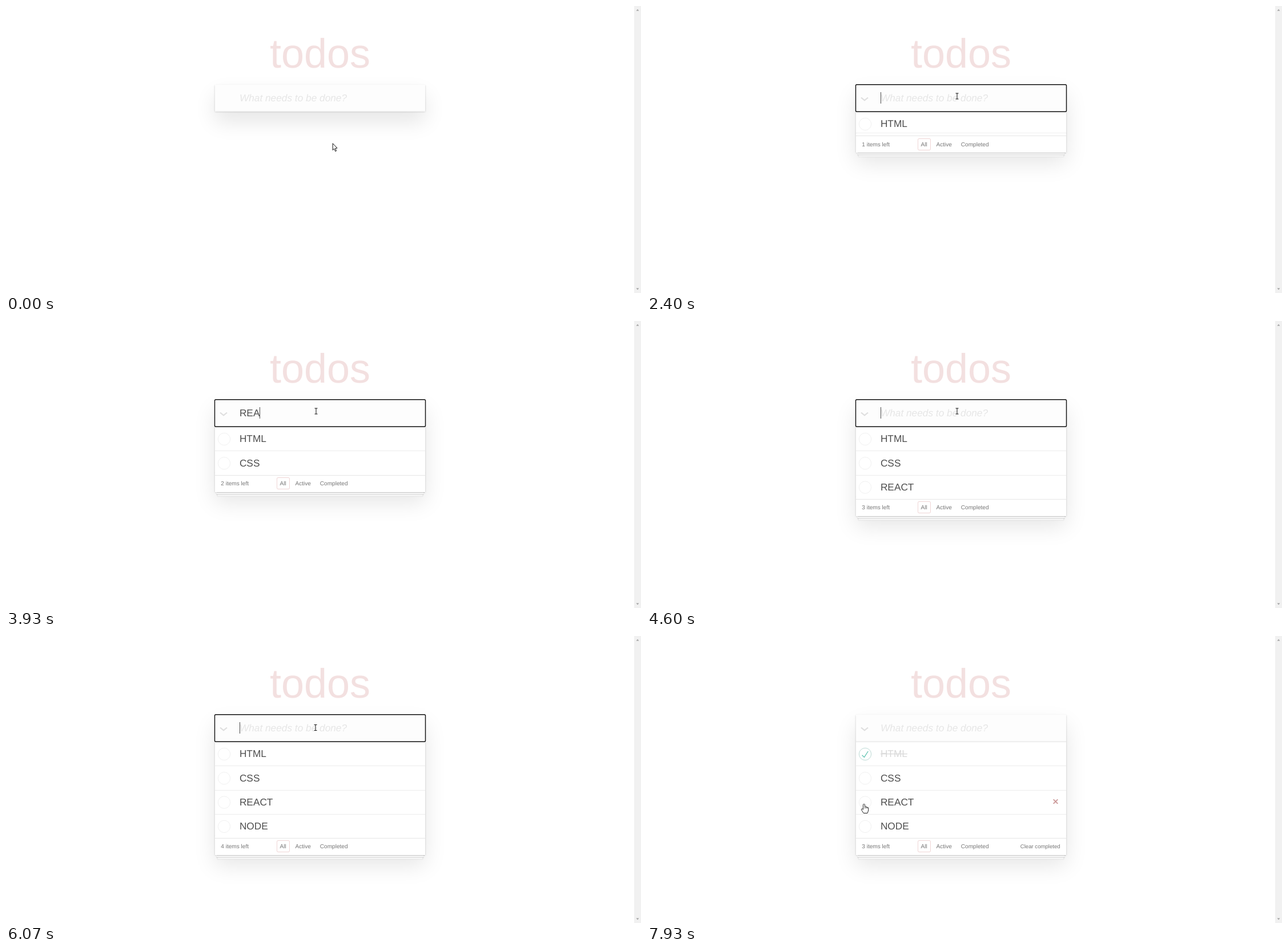
An HTML page with a canvas for the animation above (8 s loop, 1112x503 px).

```html
<!DOCTYPE html>
<html lang="en">
<head>
<meta charset="utf-8">
<title>todos</title>
<style>
  html, body { margin: 0; width: 100%; height: 100%; overflow: hidden; background: #fff; }
  canvas { display: block; }
</style>
</head>
<body>
<canvas id="stage" width="1112" height="503"></canvas>
<script>
const ctx = document.getElementById('stage').getContext('2d');

const LOOP = 8000, TICK = 200 / 3;
const LEFT = 366, RIGHT = 734, TOP = 138, LIST_TOP = 185, ROW = 42.3;
const TEXT_X = 408.9;
const SANS = '"Liberation Sans", Arial, sans-serif';

const FOCUS = 600, BLUR = 7470, CHECK = 7530, BLINK = 530;
const items = [['HTML', 1930], ['CSS', 3130], ['REACT', 4470], ['NODE', 5870]];

// Time of each keystroke; an empty string is Enter.
const typed = [
  [0, ''], [1270, 'H'], [1400, 'HT'], [1470, 'HTM'], [1730, 'HTML'], [1930, ''],
  [2530, 'C'], [2600, 'CS'], [2800, 'CSS'], [3130, ''],
  [3730, 'R'], [3800, 'RE'], [3930, 'REA'], [4070, 'REAC'], [4270, 'REACT'], [4470, ''],
  [5130, 'N'], [5200, 'NO'], [5330, 'NOD'], [5470, 'NODE'], [5870, '']
];

// Pointer hotspot: time, x, y
const path = [
  [0, 572, 242], [70, 567, 218], [270, 547, 150], [470, 547, 150], [600, 543, 158],
  [5330, 543, 158], [5400, 542.5, 160], [6070, 542.5, 160],
  [6600, 387, 327], [6670, 386, 320], [6870, 386.5, 221], [7330, 382, 206],
  [7670, 382, 206], [7930, 380, 294], [8000, 380, 294]
];

const lerp = (a, b, k) => a + (b - a) * k;
const rowY = i => LIST_TOP + ROW * i;

function last(list, t) {
  return list.reduce((found, entry) => entry[0] <= t ? entry : found);
}

function pointerAt(t) {
  const i = Math.max(1, path.findIndex(p => p[0] > t));
  const [t0, x0, y0] = path[i - 1], [t1, x1, y1] = path[i];
  const k = Math.min(1, Math.max(0, (t - t0) / (t1 - t0)));
  return { x: lerp(x0, x1, k), y: lerp(y0, y1, k) };
}

function text(str, x, y, size, color, { align = 'left', style = '' } = {}) {
  ctx.font = `${style} ${size}px ${SANS}`;
  ctx.textAlign = align;
  ctx.fillStyle = color;
  ctx.fillText(str, x, y);
}

function rect(x, y, w, h, color) {
  ctx.fillStyle = color;
  ctx.fillRect(x, y, w, h);
}

function outline(x, y, w, h, r, color, width) {
  ctx.beginPath();
  ctx.roundRect(x, y, w, h, r);
  ctx.strokeStyle = color;
  ctx.lineWidth = width;
  ctx.stroke();
}

function poly(points, { fill, stroke, width = 1, close = true }) {
  ctx.beginPath();
  points.forEach(([x, y]) => ctx.lineTo(x, y));
  if (close) ctx.closePath();
  if (fill) { ctx.fillStyle = fill; ctx.fill(); }
  if (stroke) { ctx.strokeStyle = stroke; ctx.lineWidth = width; ctx.stroke(); }
}

// Same meaning as a CSS box-shadow; the caster itself stays off stage.
function shadow(top, bottom, dy, blur, spread, color) {
  const far = 3000;
  ctx.save();
  ctx.shadowColor = color;
  ctx.shadowBlur = blur;
  ctx.shadowOffsetX = far;
  ctx.shadowOffsetY = dy;
  ctx.fillStyle = '#000';
  ctx.fillRect(LEFT - far - spread, top - spread, RIGHT - LEFT + 2 * spread, bottom - top + 2 * spread);
  ctx.restore();
}

function drawPage() {
  rect(0, 0, 1112, 503, '#fff');
  rect(1100, 0, 12, 503, '#f1f1f1');
  poly([[1103.5, 8.5], [1106, 5.5], [1108.5, 8.5]], { fill: '#a3a3a3' });
  poly([[1103.5, 494.5], [1106, 497.5], [1108.5, 494.5]], { fill: '#a3a3a3' });
  text('todos', 550, 108, 72, 'rgba(175,47,47,.15)', { align: 'center' });
}

function drawCard(count) {
  const bottom = count ? Math.round(rowY(count) + 30) : 185;
  shadow(TOP, bottom, 18, 36, 0, 'rgba(0,0,0,.1)');
  shadow(TOP, bottom, 1.44, 2.88, 0, 'rgba(0,0,0,.2)');
  if (count) {
    const top = bottom - 36;
    shadow(top, bottom, 12.24, 1.44, -4.32, 'rgba(0,0,0,.2)');
    shadow(top, bottom, 11.52, 0, -4.32, '#f6f6f6');
    shadow(top, bottom, 6.48, .72, -2.16, 'rgba(0,0,0,.2)');
    shadow(top, bottom, 5.76, 0, -2.16, '#f6f6f6');
    shadow(top, bottom, .72, .72, 0, 'rgba(0,0,0,.2)');
  }
  rect(LEFT, TOP, RIGHT - LEFT, bottom - TOP, '#fff');
  rect(LEFT, TOP, RIGHT - LEFT, LIST_TOP - TOP, '#fdfdfd');
  rect(LEFT, LIST_TOP - 2, RIGHT - LEFT, 2, '#f8f8f8');
}

function drawInput(t, count) {
  const [since, value] = last(typed, t);
  const focused = t >= FOCUS && t < BLUR;
  if (count) {
    rect(LEFT, LIST_TOP, RIGHT - LEFT, 1, '#e6e6e6');
    poly([[375, 160.5], [381, 165.3], [387, 160.5]], { stroke: '#dedede', width: 2.2, close: false });
  }
  if (value) text(value, TEXT_X, 167, 17.28, '#4d4d4d');
  else text('What needs to be done?', TEXT_X, 167, 17.28, '#e6e6e6', { style: 'italic' });
  if (!focused) return;
  outline(365.5, 137.8, 369, 47.4, 2, '#101010', 1.4);
  const idle = t - Math.max(since, FOCUS);
  if (Math.floor(idle / BLINK) % 2 === 0) {
    const w = value ? ctx.measureText(value).width : 0;
    rect(Math.round(TEXT_X + w), 151, 1, 20, '#4d4d4d');
  }
}

function drawToggle(y, checked) {
  ctx.beginPath();
  ctx.arc(382, y, 10.67, 0, 2 * Math.PI);
  ctx.strokeStyle = checked ? '#bddad5' : '#ededed';
  ctx.lineWidth = checked ? 1 : .8;
  ctx.stroke();
  if (!checked) return;
  const s = .2133;
  const tick = [[72, 25], [42, 71], [27, 56], [23, 60], [43, 80], [77, 28]];
  poly(tick.map(([a, b]) => [382 + (a - 50) * s, y + (b - 50) * s]), { fill: '#5dc2af' });
}

function drawRow(i, label, t, hovered) {
  const checked = i === 0 && t >= CHECK;
  const base = Math.round(212.4 + ROW * i);
  const fade = checked ? Math.min(1, (t - CHECK) / 290) : 0;
  const grey = Math.round(lerp(77, 217, fade));
  const color = `rgb(${grey},${grey},${grey})`;
  drawToggle(rowY(i) + 22, checked);
  text(label, TEXT_X, base, 17.28, color);
  if (checked) rect(TEXT_X, base - 6, ctx.measureText(label).width, 1.3, color);
  if (hovered) {
    const x = 715.5, y = 205.5 + ROW * i, r = 3.8;
    const look = { stroke: '#cc9a9a', width: 1.9, close: false };
    poly([[x - r, y - r], [x + r, y + r]], look);
    poly([[x + r, y - r], [x - r, y + r]], look);
  }
}

function drawFooter(t, count) {
  const base = Math.round(203.8 + 42.15 * count);
  const done = t >= CHECK;
  const label = (str, x) => text(str, x, base, 10.08, '#777');
  label(`${count - done} items left`, 376.3);
  label('All', 479.5);
  label('Active', 506.5);
  label('Completed', 549.8);
  outline(474.5, base - 13.5, 22, 20, 2, 'rgba(175,47,47,.2)', 1);
  if (done) text('Clear completed', 723.6, base, 9.6, '#777', { align: 'right' });
}

function drawList(t, count, pointer) {
  for (let i = 0; i < count; i++) {
    const inside = pointer.y >= rowY(i) && pointer.y < rowY(i + 1);
    drawRow(i, items[i][0], t, inside);
    rect(LEFT, Math.round(rowY(i + 1)), RIGHT - LEFT, 1, i === count - 1 ? '#e6e6e6' : '#ededed');
  }
  if (count === 1) rect(LEFT, 222, RIGHT - LEFT, 1, '#efefef');
  if (count) drawFooter(t, count);
}

function drawBeam() {
  const bars = (grow, color) => {
    rect(-.5 - grow, -5 - grow, 1 + 2 * grow, 10 + 2 * grow, color);
    for (const y of [-5.5, 4.5]) rect(-2.5 - grow, y - grow, 5 + 2 * grow, 1 + 2 * grow, color);
  };
  bars(.5, 'rgba(255,255,255,.7)');
  bars(0, '#111');
}

function drawArrow() {
  poly([[.5, .5], [.5, 12.3], [3.1, 9.8], [5, 14.4], [6.9, 13.6], [5, 9.1], [8.4, 8.8]],
    { fill: '#fff', stroke: '#111' });
}

function drawHand() {
  ctx.beginPath();
  ctx.moveTo(-1.5, 10);
  ctx.lineTo(-1.5, 1.5);
  ctx.quadraticCurveTo(0, -.8, 1.5, 1.5);
  ctx.lineTo(1.5, 5.2);
  ctx.quadraticCurveTo(3, 4.2, 3.9, 5.8);
  ctx.quadraticCurveTo(5.3, 5, 6, 6.6);
  ctx.quadraticCurveTo(7.8, 6.2, 7.8, 8.2);
  ctx.lineTo(7.6, 12);
  ctx.lineTo(6, 16.5);
  ctx.lineTo(-.8, 16.5);
  ctx.lineTo(-4.6, 10.4);
  ctx.quadraticCurveTo(-4.8, 7.6, -1.5, 10);
  ctx.closePath();
  ctx.fillStyle = '#fff';
  ctx.fill();
  ctx.strokeStyle = '#222';
  ctx.lineWidth = 1;
  ctx.stroke();
  for (const x of [1.5, 3.9, 6]) poly([[x, 5.8], [x, 8.3]], { stroke: '#222', width: .8, close: false });
}

function drawPointer({ x, y }, count) {
  const inInput = y >= TOP && y < LIST_TOP && x > LEFT && x < RIGHT;
  const onToggle = x < 394.5 && y >= LIST_TOP && y < rowY(count);
  ctx.save();
  ctx.translate(x, y);
  if (inInput) drawBeam();
  else if (onToggle) drawHand();
  else drawArrow();
  ctx.restore();
}

function draw(t) {
  const count = items.filter(([, added]) => added <= t).length;
  const pointer = pointerAt(t);
  drawPage();
  drawCard(count);
  drawList(t, count, pointer);
  drawInput(t, count);
  drawPointer(pointer, count);
}

function frame(now) {
  const step = Math.floor((now % LOOP + 5) / TICK) % (LOOP / TICK);
  ctx.textRendering = 'geometricPrecision';
  draw(step * TICK + 5);
  requestAnimationFrame(frame);
}
requestAnimationFrame(frame);
</script>
</body>
</html>
```
